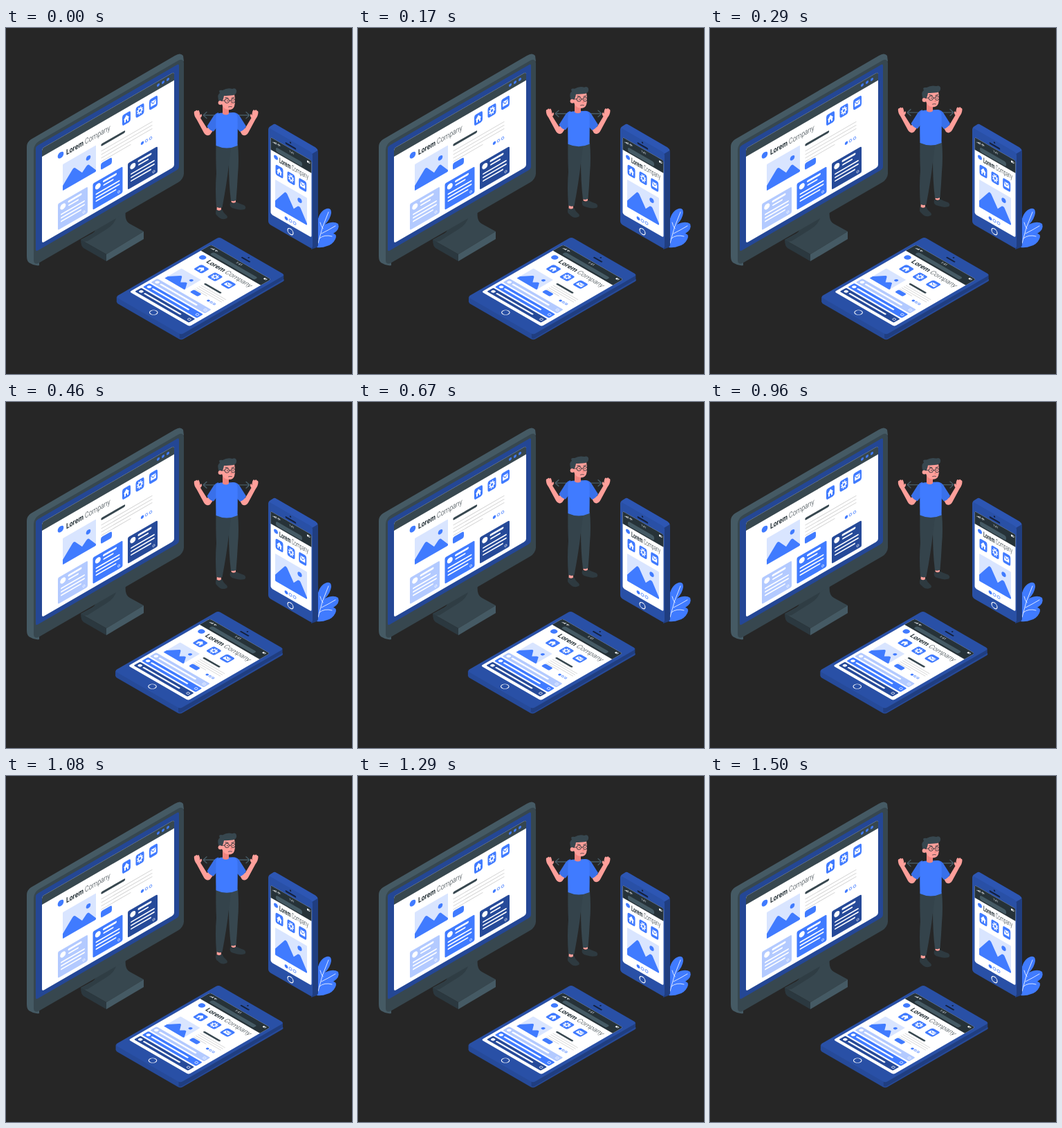
Animation of 500x500 px, one loop 1.54 s. Source, as an HTML page:

```html
<!DOCTYPE html>
<html lang="en">
<head>
<meta charset="utf-8">
<title>Responsive design</title>
<style>
html, body { margin: 0; width: 100%; height: 100%; overflow: hidden; background: #262626; }
svg { display: block; width: 100vw; height: 100vh; }
text { font-family: Roboto, sans-serif; }
</style>
</head>
<body>
<svg id="stage" viewBox="0 0 500 500"></svg>
<script>
const BLUE = '#407bff', MID = '#2d56b3', FACE = '#2950a6', NAVY = '#264a99', DEEP = '#203e80';
const PALE = '#b3caff', MIST = '#d9e5ff', SLATE = '#37474f', STEEL = '#455a64';
const INK = '#263238', SKIN = '#ff9f9a', WHITE = '#fff', HOLE = '#14213d', GREY = '#d4d4d4';

const rect = (x, y, w, h, fill, r = 0) =>
  `<rect x="${x}" y="${y}" width="${w}" height="${h}" rx="${r}" fill="${fill}"/>`;
const disc = (x, y, r, fill) => `<circle cx="${x}" cy="${y}" r="${r}" fill="${fill}"/>`;
const ring = (x, y, r, color, w) =>
  `<circle cx="${x}" cy="${y}" r="${r}" fill="none" stroke="${color}" stroke-width="${w}"/>`;
const path = (d, fill) => `<path d="${d}" fill="${fill}"/>`;
const line = (d, color, w) =>
  `<path d="${d}" fill="none" stroke="${color}" stroke-width="${w}" stroke-linecap="round" stroke-linejoin="round"/>`;
const bar = (x1, x2, y, color, w) => line(`M${x1} ${y}H${x2}`, color, w);
const group = (transform, body) => `<g transform="${transform}">${body}</g>`;

const glyphs = {
  home: path('M6 2.3L10.2 6.3H9V9.7H7V7.3H5V9.7H3V6.3H1.8Z', WHITE),
  gear: ring(6, 6, 2.3, WHITE, 1.5) +
    `<circle cx="6" cy="6" r="3.6" fill="none" stroke="#fff" stroke-width="1.5" stroke-dasharray="1.5 1.327"/>`,
  mail: rect(2.1, 3.4, 7.8, 5.6, WHITE, .6) + line('M2.6 4L6 6.8L9.4 4', BLUE, .8)
};

function icon(kind, cx, cy, w, h) {
  return group(`translate(${cx - w / 2} ${cy - h / 2}) scale(${w / 12} ${h / 12})`,
    rect(0, 0, 12, 12, BLUE, 2.4) + glyphs[kind]);
}

function icons(xs, y, w, h) {
  return ['home', 'gear', 'mail'].map((kind, i) => icon(kind, xs[i], y, w, h)).join('');
}

// lift raises the peaks above the lower edge
function picture(x, y, w, h, lift = 1) {
  const hills = path('M0 37V31L14 15.5Q16 13.5 18 15.5L28 28L34 22.5Q36 21 38 22.5L48 36V37Q48 38 47 38H1Q0 38 0 37Z', BLUE);
  return group(`translate(${x} ${y}) scale(${w / 48} ${h / 38})`,
    rect(0, 0, 48, 38, MIST, 1) +
    group(`translate(0 ${38 - 38 * lift}) scale(1 ${lift})`, hills) +
    disc(37, 12 - 12 * (lift - 1), 3.3, BLUE));
}

function title(x, y, size, sx) {
  return group(`translate(${x} ${y}) scale(${sx} 1)`,
    `<text font-size="${size}" fill="${INK}"><tspan font-weight="700">Lorem</tspan><tspan font-weight="300"> Company</tspan></text>`);
}

function pager(x, y, step, r) {
  return disc(x, y, r, BLUE) + ring(x + step, y, r - .4, BLUE, .7) + ring(x + 2 * step, y, r - .4, BLUE, .7);
}

// Signal, clock and battery
function status(x1, x2, y, size) {
  const mid = (x1 + x2) / 2;
  let s = '';
  for (let i = 0; i < 4; i++) s += rect(x1 + i * 1.4, y + .6 - i * .6, .9, 1 + i * .6, WHITE);
  s += line(`M${x1 + 7} ${y}q1.8 -2 3.6 0M${x1 + 8.2} ${y + 1}q.6 -.7 1.2 0`, WHITE, .7);
  s += `<text x="${mid}" y="${y + 1.5}" font-size="${size}" fill="#fff" text-anchor="middle">1:41</text>`;
  return s + rect(x2 - 5, y - 1.4, 4.4, 2.8, WHITE, .6) + rect(x2 - 2.6, y - .9, 1.4, 1.8, SLATE);
}

function card(x, fill) {
  const y = 297;
  return rect(x, y, 43, 38, fill, 2) + disc(x + 7.3, y + 8, 4, WHITE) +
    bar(x + 16, x + 33, y + 5.5, WHITE, 3) + bar(x + 16, x + 29, y + 11, WHITE, 2) +
    [18, 23, 28].map((d, i) => bar(x + 5, x + (i < 2 ? 38 : 33), y + d, WHITE, 1.9)).join('') +
    ring(x + 37.5, y + 33.5, 1.5, WHITE, .6);
}

function monitor() {
  const stand =
    path('M108 306L121 299Q130 295 130 289L173 264Q171 279 179 283L199 294L145 327Z', SLATE) +
    path('M108 306L121 299Q130 295 130 289L160 272Q157 284 145 291L118 308L112 309Z', '#2f3d44') +
    path('M108 306L145 327V337L112 318Q108 315 108 306Z', '#2b383f') +
    path('M145 327L199 294V305L145 337Z', STEEL);
  const back = path('M30 172Q30 165 36 161L244 40Q252 35 256 40L257 48L48 172V343Q41 344 35 340Q30 338 30 330Z', STEEL);
  const page =
    disc(79, 228.8, 4.3, BLUE) + title(87, 233.6, 11, .79) +
    icons([174, 193.5, 213], 230.7, 12, 15.5) +
    picture(82, 244, 48, 38) +
    bar(139, 170.5, 248.4, SLATE, 3.4) +
    [257, 262, 267].map(y => bar(138, 211, y, GREY, 1.1)).join('') +
    bar(138, 180, 272, GREY, 1.1) +
    rect(137, 274.5, 16, 9.5, BLUE, 2.5) +
    pager(197, 279.6, 6, 2.2) +
    card(75, PALE) + card(125.5, BLUE) + card(176, NAVY);
  const face =
    rect(40, 191, 217, 176, SLATE, 8) +
    rect(43, 196, 207, 152, '#244795', 3) +
    rect(52, 204, 191, 137, WHITE, 3) +
    path('M52 216V207Q52 204 55 204H240Q243 204 243 207V216Z', SLATE) +
    [220, 227, 234].map(x => disc(x, 209.6, 2, BLUE)).join('') +
    group('translate(0 .5)', page);
  return stand + back + group('matrix(1 -.578 0 1 0 0)', face);
}

function leaf() {
  return path('M449 317V284Q452 266 461 262Q470 258 470 267Q469 276 461 284Q473 278 480 283Q483 291 473 297Q479 298 476 305Q472 313 464 315Q457 318 449 317Z', BLUE) +
    line('M451 311Q456 288 466 266M456 297Q466 292 476 286M453 304Q460 298 471 301M458 290Q455 286 454 281', WHITE, .8);
}

function phone() {
  const rim =
    path('M391 140L447 172.5Q451 175 451 180V313Q451 316 448 317.5L441 320V182Z', DEEP) +
    path('M379 148Q379 143.5 382 142L386 139.5Q388 138 391 140L447 172.5Q450 174.5 450.5 177L442 182Z', MID);
  const face =
    rect(379, -75, 64, 139, FACE, 4) +
    bar(405, 418, -67, HOLE, 2.6) + disc(411, -71.5, 1.2, HOLE) +
    rect(382.5, -63, 59, 111, WHITE, 2.5) +
    path('M382.5 -45V-61Q382.5 -63 385 -63H439Q441.5 -63 441.5 -61V-45Z', INK) +
    status(385.5, 440, -58.5, 4) +
    rect(390, -53, 38, 6.5, STEEL, 2.5) +
    disc(390, -38, 3, BLUE) + title(395, -33.4, 10.5, .545) +
    icons([395, 412, 428.7], -20.5, 11, 15) +
    picture(389, -5.5, 46, 39.5, 1.22) +
    pager(405, 41.4, 6, 2.4) +
    ring(411, 57, 4, WHITE, 1.1);
  return leaf() + rim + group('matrix(1 .577 0 1 0 0)', face);
}

function row(y, fill) {
  return rect(9.5, y - 5.4, 90, 10.8, fill, 1.5) + disc(14.8, y, 2.6, WHITE) +
    bar(21, 80, y, WHITE, 2.6) + ring(95, y, 2, WHITE, .7);
}

function tablet() {
  const iso = y => `matrix(.866 .5 -.866 .5 308.2 ${y})`;
  const sides =
    group(iso(309), rect(1.2, 0, 109.5, 174, NAVY, 4)) +
    path('M160 388.5V396L253 447V440Z', NAVY) +
    path('M401.5 356V363L256 448Q253 450 251 448V438Z', DEEP);
  const face =
    rect(1.2, 1, 109.5, 173, FACE, 4) +
    bar(50, 62, 11.5, HOLE, 2.4) + disc(55.5, 6.2, 1.1, HOLE) +
    rect(5.5, 19, 100, 136, WHITE, 3) +
    path('M5.5 36V22Q5.5 19 8.5 19H102.5Q105.5 19 105.5 22V36Z', INK) +
    status(10, 103, 23.2, 5) +
    rect(18, 27.5, 74, 6, STEEL, 2.5) +
    disc(16.8, 44.3, 4.3, BLUE) + title(26, 48.6, 10, 1) +
    icons([32.5, 55.2, 77.4], 62, 13.5, 13.5) +
    picture(15, 78, 33, 28) +
    bar(57.5, 82.5, 80.6, SLATE, 2.8) +
    [86, 89.5, 93].map(y => bar(56, 97, y, GREY, .8)).join('') +
    bar(56, 76, 96.4, GREY, .8) +
    rect(56, 98, 13, 7, BLUE, 2) +
    pager(84, 101.9, 4.8, 1.9) +
    row(118, PALE) + row(131.4, BLUE) + row(144.8, NAVY) +
    ring(55.4, 164.8, 4.6, WHITE, 1.1);
  return sides + group(iso(301), face);
}

function man() {
  const shoes =
    path('M304 262Q308 265 312 262Q314 267 319 271Q322 275 316 276Q310 277 306 272Q301 269 304 262Z', '#2e3a40') +
    path('M324 252Q329 255 332 251Q338 254 344 256Q348 259 345 262Q338 264 330 261Q322 260 324 252Z', '#2e3a40');
  const legs =
    path('M305 255H311L311 262.5Q308 265 304.5 262.5Z', SKIN) +
    path('M326 245H332L332 251.5Q329 254 325.5 251.5Z', SKIN) +
    path('M318 168H335Q337 190 335 212Q334 232 332.5 249Q329 251 325 249.5Q322 225 322 195Z', SLATE) +
    path('M303.5 166H326L322 198Q319 225 312.5 259Q308 261 304 258.5Q302 232 304 210Q303 190 303.5 166Z', '#34434b');
  const arms =
    path('M300 147L295 141L290.5 145L281 130Q284 127 282.5 124.5Q281 124 280.5 126.5Q280 121 278.5 119Q277.5 118 277 120Q275 117.5 274 120Q272 119.5 271.8 121.5Q271.5 127 275.5 132L286 151.5Q290 157.5 295 154Z', SKIN) +
    path('M337 147L342 141L345.5 145L354.5 130Q352 127 353.5 124.5Q355 124 355.5 126.5Q355.5 121 357 119Q358.5 117.5 359.5 119.5Q361.5 117 362.5 119.5Q364.5 119.5 364.5 121.5Q364.5 127 360.5 132L350 151.5Q346 157.5 341 154Z', SKIN);
  const shirt =
    path('M307 122Q303 123 300 127L290.5 142Q294 148 300 149.5L305 143ZM330 122Q335 123 337.5 127L347 142Q344 148 338 150L332 143Z', '#3970ea') +
    path('M306 123.5Q312 122 319 122.5L329 122Q333 123 334.5 128Q335 145 334.5 170Q319 177 303.5 170Q303 145 303.5 130Q303 125 306 123.5Z', BLUE);
  const head =
    path('M313 110H322V124Q318 127 313 124Z', '#f0847f') +
    path('M312 97Q322 91 330 96Q332 106 330 113Q328 119 321 118Q314 117 312 110Z', SKIN) +
    path('M307 104Q305 96 309 94Q306 89 313 90Q320 86 327 88Q332 86 333 90Q334 95 329 97Q320 98 315 98Q314 104 312 106L311 112Q308 109 307 104Z', SLATE) +
    disc(309.6, 108, 3, SKIN) +
    line('M311 105H316M322.5 105H325', INK, .8) +
    ring(319.3, 105.2, 3.2, INK, .9) + ring(328.2, 105.2, 3, INK, .9) +
    disc(319.8, 105.2, .8, INK) + disc(328, 105.2, .8, INK) +
    line('M317 100.5L321 101.3M326 101.3L329.5 100.3', INK, .9) +
    line('M325 106L326.5 110H324.5', '#e0706d', .7) +
    line('M321.5 114Q324 113 326.5 113.8', INK, .7);
  const arrow = line('M285 126H352M290 121.5L285 126L290 130.5M347 121.5L352 126L347 130.5', STEEL, 1.4);
  return arrow + shoes + legs + arms + shirt + head;
}

document.getElementById('stage').innerHTML =
  rect(0, 0, 500, 500, '#262626') + monitor() + phone() +
  `<g id="tablet">${tablet()}</g><g id="man">${man()}</g>`;

const tabletNode = document.getElementById('tablet');
const manNode = document.getElementById('man');
const LOOP = 1540, CYCLE = 1500, LEAD = 30, FPS = 24;
const shakeStops = [0, -1, 2, -4, 4, -4, 4, -4, 2, -1, 0];

function shake(p) {
  const i = Math.min(9, Math.floor(p * 10));
  return shakeStops[i] + (shakeStops[i + 1] - shakeStops[i]) * (p * 10 - i);
}

const float = p => -10 * (1 - Math.abs(2 * p - 1));

function draw(ms) {
  const step = Math.floor((ms % LOOP + 5) * FPS / 1000) % 37;
  const p = ((step * 1000 / FPS + LEAD) % CYCLE) / CYCLE;
  tabletNode.setAttribute('transform', `translate(${shake(p).toFixed(3)} 0)`);
  manNode.setAttribute('transform', `translate(0 ${(float(p) + .4).toFixed(3)})`);
}

let start = null;
function tick(now) {
  if (start === null) start = now;
  draw(now - start);
  requestAnimationFrame(tick);
}
draw(0);
requestAnimationFrame(tick);
</script>
</body>
</html>
```
